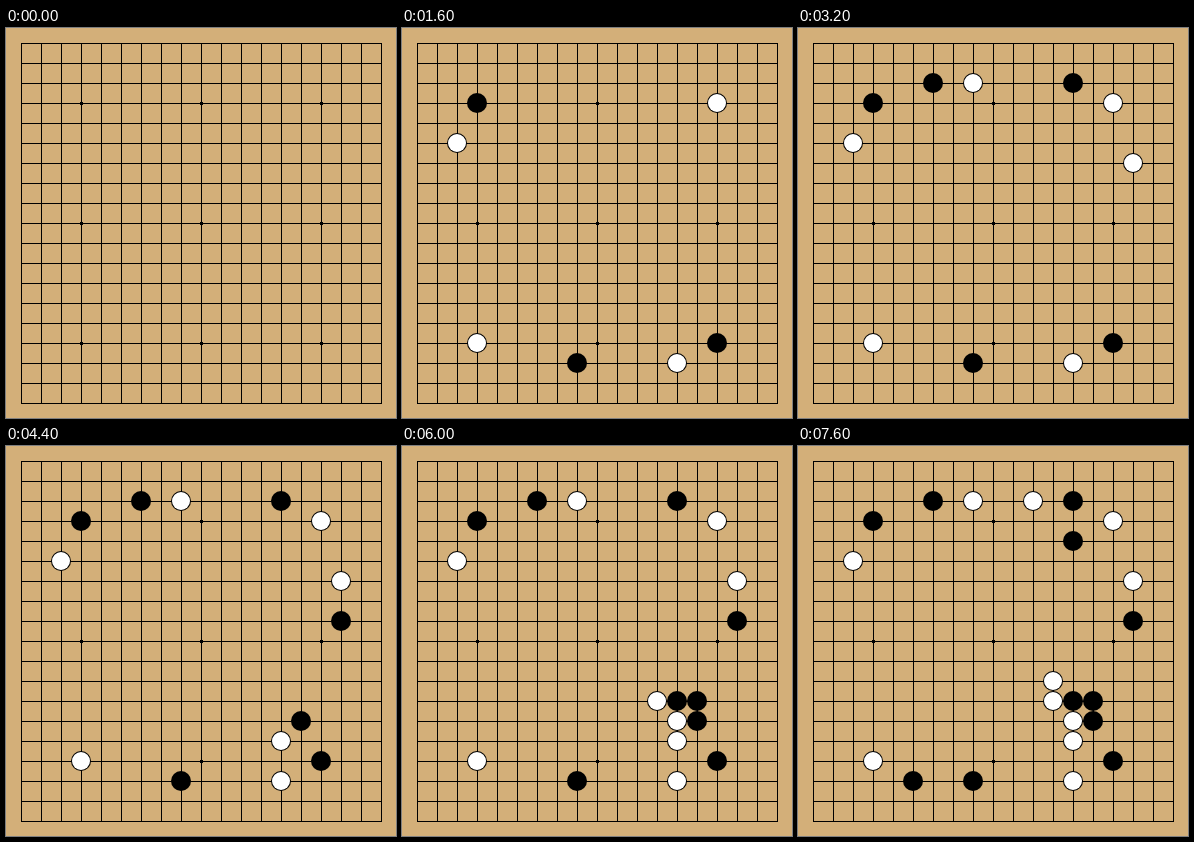
These frames come from a looping animation (390x390 px, 8000 ms). An HTML page with a canvas:

```html
<!DOCTYPE html>
<html lang="en">
<head>
<meta charset="utf-8">
<title>Go opening</title>
<style>
  html, body { margin: 0; width: 100%; height: 100%; overflow: hidden; background: #d3af79; }
  canvas { display: block; width: 390px; height: 390px; }
</style>
</head>
<body>
<canvas id="board" width="390" height="390"></canvas>
<script>
const ctx = document.getElementById('board').getContext('2d');
const CELL = 20, EDGE = 15, SIZE = 19;
const STEP = 400, LOOP = 8000;

// Column and row letters; white moves first after the four corner stones.
const handicap = ['dd', 'pp', 'pd', 'dp'];
const moves = 'nq iq cf gc ic nc qg qi no on nn nm mm om ml fq lc ne'.split(' ');

const at = letter => EDGE + CELL * (letter.charCodeAt(0) - 97);

function drawBoard() {
  ctx.fillStyle = '#d3af79';
  ctx.fillRect(0, 0, 390, 390);
  ctx.fillStyle = '#000';
  const span = CELL * (SIZE - 1) + 1;
  for (let i = 0; i < SIZE; i++) {
    const p = EDGE + CELL * i;
    ctx.fillRect(EDGE, p, span, 1);
    ctx.fillRect(p, EDGE, 1, span);
  }
  for (const x of 'djp') {
    for (const y of 'djp') ctx.fillRect(at(x) - 1, at(y) - 1, 3, 3);
  }
}

function disc(x, y, r, color) {
  ctx.fillStyle = color;
  ctx.beginPath();
  ctx.arc(x, y, r, 0, Math.PI * 2);
  ctx.fill();
}

function drawStone(point, white) {
  const x = at(point[0]), y = at(point[1]);
  disc(x, y, 10, '#000');
  if (white) disc(x, y, 9, '#fff');
}

let shown = -1;
function render(now) {
  const step = Math.floor((now % LOOP) / STEP);
  if (step !== shown) {
    shown = step;
    drawBoard();
    if (step > 0) {
      handicap.forEach((p, i) => drawStone(p, i > 1));
      moves.slice(0, step - 1).forEach((p, i) => drawStone(p, i % 2 === 0));
    }
  }
}

let start;
function tick(now) {
  start ??= now;
  render(now - start);
  requestAnimationFrame(tick);
}
render(0);
requestAnimationFrame(tick);
</script>
</body>
</html>
```
